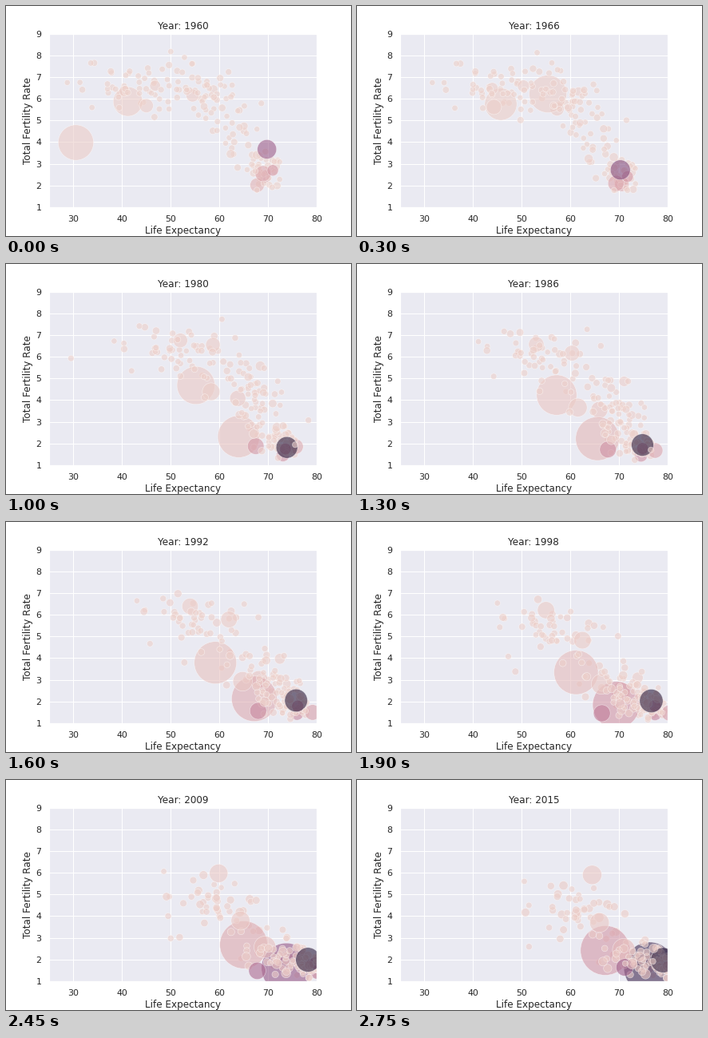
Recreate the animation shown at these times as a matplotlib script. Size 432x288 px, loop 2800 ms.

```python
import matplotlib.pyplot as plt
import numpy as np
from matplotlib.animation import FuncAnimation

YEARS = np.arange(1960, 2016)
SPAN = (YEARS - YEARS[0]) / (YEARS[-1] - YEARS[0])
INK = "#262626"


def logistic(high, low, mid, width):
    return low + (high - low) / (1 + np.exp((YEARS - mid) / width))


def bump(year, width):
    return np.exp(-((YEARS - year) / width) ** 2)


def linear(start, end):
    return start + (end - start) * SPAN


def geometric(start, end):
    return start * (end / start) ** SPAN


def cubehelix(t):
    """Light pink to dark violet for t from 0 to 1."""
    x = 0.85 - 0.7 * np.clip(t, 0, 1)
    amp = 0.4 * x * (1 - x)
    phi = 0.8 * np.pi * x
    parts = [(-0.14861, 1.78277), (-0.29227, -0.90649), (1.97294, 0)]
    rgb = [x + amp * (p * np.cos(phi) + q * np.sin(phi)) for p, q in parts]
    return np.clip(np.stack(rgb, axis=-1), 0, 1)


def nation(pop, hue, *points):
    """Path through (year, life, fertility) points; pop and hue at both ends."""
    year, life, fert = zip(*points)
    return (np.interp(YEARS, year, life), np.interp(YEARS, year, fert),
            linear(*pop), geometric(*hue))


# The largest countries, in alphabetical order
def large_countries():
    return [
        nation((72, 206), (0.02, 0.12),  # Brazil
               (1960, 54.5, 6.15), (1980, 63.8, 4.08), (2004, 72.5, 1.95),
               (2015, 75.3, 1.75)),
        nation((660, 1410), (0.015, 0.92),  # China
               (1960, 30.5, 3.98), (1961, 33, 3.3), (1963, 50, 7.4),
               (1966, 55.4, 6.22), (1972, 61.4, 4.92), (1980, 64, 2.32),
               (1992, 67.2, 2.13), (2003, 71.3, 1.6), (2015, 76.3, 1.62)),
        nation((73, 81), (0.2, 0.45),  # Germany
               (1960, 69.3, 2.4), (1980, 73.1, 1.47), (2015, 81.5, 1.4)),
        nation((450, 1310), (0.01, 0.25),  # India
               (1960, 41.2, 5.87), (1966, 45.7, 5.75), (1980, 55.2, 4.68),
               (2004, 63.2, 2.9), (2015, 67.2, 2.42)),
        nation((88, 258), (0.01, 0.1),  # Indonesia
               (1960, 45, 5.68), (1966, 44.3, 5.62), (1972, 54, 5.36),
               (1992, 64.8, 2.93), (2015, 71, 2.45)),
        nation((93, 128), (0.13, 0.3),  # Japan
               (1960, 67.8, 2.02), (1972, 73.4, 2.1), (1992, 79.2, 1.5),
               (2015, 83.8, 1.4)),
        nation((45, 182), (0.01, 0.04),  # Nigeria
               (1960, 40.5, 6.35), (1980, 52, 6.75), (2004, 56, 6.03),
               (2015, 64.5, 5.9)),
        nation((45, 189), (0.01, 0.04),  # Pakistan
               (1960, 46.8, 6.6), (1980, 58.7, 6.55), (1992, 62, 5.78),
               (2004, 63, 3.87), (2015, 66, 3.7)),
        nation((120, 144), (0.17, 0.55),  # Russia
               (1960, 69, 2.55), (1966, 69.4, 2.1), (1980, 67.5, 1.88),
               (1992, 68, 1.57), (2004, 65, 1.35), (2015, 71.2, 1.64)),
        nation((52, 65), (0.24, 0.4),  # United Kingdom
               (1960, 71, 2.7), (1980, 73.6, 1.75), (2015, 81, 1.85)),
        nation((182, 321), (0.56, 2.8),  # United States
               (1960, 69.8, 3.67), (1966, 70.3, 2.72), (1972, 71.2, 2.02),
               (1980, 73.9, 1.82), (1992, 75.8, 2.05), (2015, 79.1, 1.97)),
    ]


def small_country(rng, life, life_sd, fert, fert_sd, mid, growth):
    """One country passing from high to low fertility as life lengthens."""
    lag, luck, haste, high, low = np.clip(rng.normal(size=5), -2.2, 2.2)
    years = np.interp(YEARS, [1960, 1985, 2015], life)
    years += life_sd * (0.8 * luck - 0.6 * lag + 0.5 * haste * (SPAN - 0.5))
    births = logistic(fert[0] + fert_sd[0] * high, fert[1] + fert_sd[1] * low,
                      mid + 9 * lag, 8)
    pop = np.clip(rng.lognormal(1.1, 1.1), 0.2, 25)
    return [years, np.maximum(births, 1.2 + 0.05 * low),
            geometric(pop, min(pop * growth, 70)),
            geometric(0.001, 0.003 * pop + 0.002)]


def small_countries(rng):
    def group(count, *rule):
        return [small_country(rng, *rule) for _ in range(count)]

    africa = group(47, (42, 53, 61.5), 5.2, (6.8, 3.9), (0.6, 0.8), 2000, 3.2)
    for country in africa[:9]:  # late epidemic
        country[0] -= rng.uniform(5, 11) * bump(2003, 9)
    africa[10][0] -= 24 * bump(1978.5, 3)  # wars
    africa[11][0] -= 38 * bump(1994, 1)
    return (africa
            + group(54, (54.5, 67, 74.5), 5.3, (6.75, 2.05), (0.75, 0.4),
                    1986, 2.6)
            + group(27, (63.5, 69.5, 74), 3, (4.8, 1.9), (1, 0.3), 1974, 1.7)
            + group(34, (69.3, 74, 80.5), 2.2, (2.9, 1.55), (0.5, 0.2),
                    1973, 1.3))


rng = np.random.default_rng(7)
large, small = large_countries(), small_countries(rng)
rank = np.append(np.linspace(0.12, 0.95, len(large)), rng.random(len(small)))
data = np.array(large + small)[np.argsort(rank)]
life, fert, pop, hue = data.transpose(1, 2, 0)
sizes = 50 + 2.9 * pop
colors = cubehelix(hue)

plt.rcParams["font.family"] = "DejaVu Sans"
fig = plt.figure(figsize=(6, 4), dpi=72, facecolor="white")
ax = fig.add_axes([0.125, 0.125, 0.775, 0.755], facecolor="#EAEAF2")
ax.set(xlim=(25, 80), ylim=(1, 9), xticks=range(30, 81, 10),
       yticks=range(1, 10))
ax.set_axisbelow(True)
ax.grid(color="white", linewidth=1, solid_capstyle="round")
ax.tick_params(length=0, pad=9.5, labelsize=11, labelcolor=INK)
for spine in ax.spines.values():
    spine.set(color="white", linewidth=1.25)
ax.set_xlabel("Life Expectancy", fontsize=12, color=INK, labelpad=4)
ax.set_ylabel("Total Fertility Rate", fontsize=12, color=INK, labelpad=4)
title = ax.set_title("Year: 1960", fontsize=12, color=INK, pad=6)
dots = ax.scatter(life[0], fert[0], s=sizes[0], c=colors[0], alpha=0.6,
                  edgecolors="white", linewidths=0.57)


def draw(i):
    dots.set_offsets(np.column_stack([life[i], fert[i]]))
    dots.set_sizes(sizes[i])
    dots.set_facecolor(colors[i])
    title.set_text(f"Year: {YEARS[i]}")
    return dots, title


anim = FuncAnimation(fig, draw, frames=len(YEARS), interval=50, repeat=True,
                     repeat_delay=0, blit=False)
plt.show()
```
